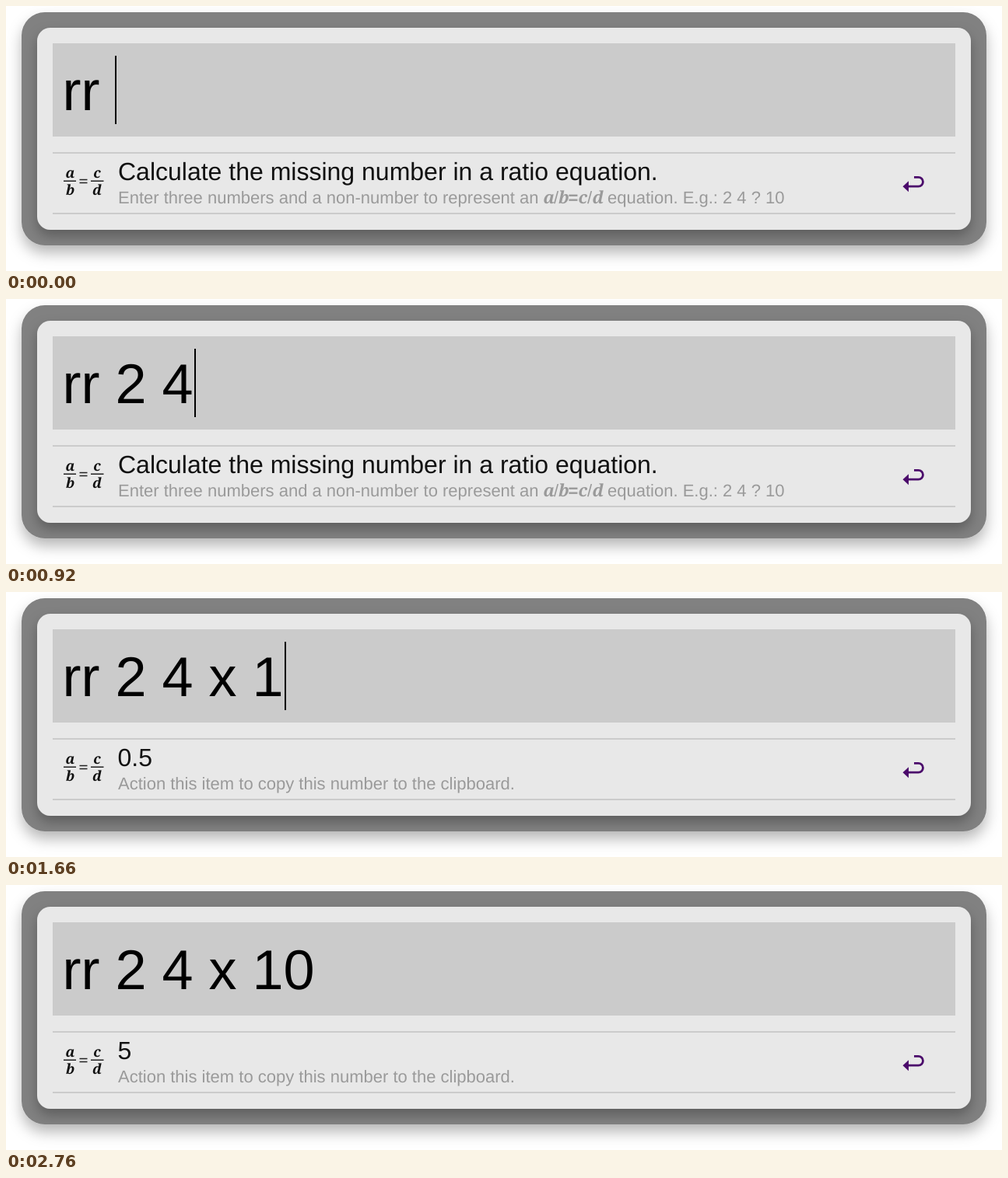
Recreate the animation shown at these times as an HTML page. Size 1280 px wide and 341 px high, loop 2.78 s.

```html
<!DOCTYPE html>
<html lang="en">
<head>
<meta charset="utf-8">
<title>Ratio calculator</title>
<style>
  html, body { margin: 0; width: 100%; height: 100%; overflow: hidden; background: #fff; }
  svg { display: block; width: 100%; height: 100%; }
  text { font-family: "Liberation Sans", Arial, sans-serif; font-kerning: none; text-rendering: geometricPrecision; }
  .query { font-size: 72px; fill: #000; }
  .title { font-size: 32px; fill: #111; }
  .sub { font-size: 22px; fill: #9a9a9a; }
  .math { font-family: "Noto Serif", serif; font-weight: 700; font-style: italic; }
  .icon text { font-size: 18px; text-anchor: middle; fill: #111; }
</style>
</head>
<body>
<svg viewBox="0 0 1280 341">
  <defs>
    <filter id="outerShadow" x="-5%" y="-20%" width="110%" height="140%">
      <feDropShadow dx="0" dy="10" stdDeviation="9" flood-color="#000" flood-opacity=".28"/>
    </filter>
    <filter id="innerShadow" x="-5%" y="-20%" width="110%" height="140%">
      <feDropShadow dx="0" dy="8" stdDeviation="8" flood-color="#000" flood-opacity=".28"/>
    </filter>
  </defs>

  <rect x="20" y="8" width="1240" height="300" rx="30" fill="#818181" filter="url(#outerShadow)"/>
  <rect x="40" y="28" width="1200" height="260" rx="17" fill="#e8e8e8" filter="url(#innerShadow)"/>
  <rect x="60" y="48" width="1160" height="120" fill="#cbcbcb"/>
  <path d="M60 189H1220M60 267H1220" stroke="#cbcbcb" stroke-width="2"/>

  <text id="query" class="query" x="72.5" y="134"></text>
  <rect id="caret" y="64" width="2" height="88"/>

  <g class="icon">
    <text class="math" x="82.5" y="221">a</text>
    <text class="math" x="82.5" y="242.5">b</text>
    <text class="math" x="117" y="221">c</text>
    <text class="math" x="117" y="242.5">d</text>
    <path d="M74 225.3H90M109 225.3H125.500M94.500 223.500H104.500M94.500 227.500H104.500" stroke="#222" stroke-width="1.6"/>
  </g>

  <g id="help">
    <text class="title" x="144" y="224">Calculate the missing number in a ratio equation.</text>
    <text class="sub" x="144" y="254">Enter three numbers and a non-number to represent an</text>
    <text class="sub" y="254"><tspan class="math" x="690.5">a</tspan><tspan x="704">/</tspan><tspan class="math" x="710">b</tspan><tspan x="722.5" font-weight="700">=</tspan><tspan class="math" x="735.5">c</tspan><tspan x="747">/</tspan><tspan class="math" x="753.5">d</tspan></text>
    <text class="sub" x="773" y="254">equation. E.g.: 2 4 ? 10</text>
  </g>
  <g id="answer">
    <text id="result" class="title" x="143.5" y="224"></text>
    <text class="sub" x="144" y="254">Action this item to copy this number to the clipboard.</text>
  </g>

  <path d="M1167 220.300H1172.500A5.900 5.900 0 0 1 1172.500 232.200H1158" fill="none" stroke="#4b0a6b" stroke-width="2.8"/>
  <path d="M1152.500 232.200L1160 225.300V239.200Z" fill="#4b0a6b"/>
</svg>
<script>
  const LOOP = 2780;
  const CARET_OFF = 2360;

  // Each keystroke: time, typed text, caret x, result (empty shows the help)
  const keys = [
    [0, "rr", 140, ""],
    [240, "rr 2", 182, ""],
    [400, "rr 2", 202, ""],
    [800, "rr 2 4", 242, ""],
    [1000, "rr 2 4", 262, ""],
    [1180, "rr 2 4 x", 298, ""],
    [1360, "rr 2 4 x", 318, "0"],
    [1660, "rr 2 4 x 1", 358, "0.5"],
    [1800, "rr 2 4 x 10", 398, "5"]
  ];

  const el = id => document.getElementById(id);
  const show = (id, on) => el(id).setAttribute("visibility", on ? "visible" : "hidden");

  function draw(t) {
    const [, typed, caretX, result] = keys.filter(k => k[0] <= t).pop();
    el("query").textContent = typed;
    el("result").textContent = result;
    el("caret").setAttribute("x", caretX);
    show("caret", t < CARET_OFF);
    show("help", !result);
    show("answer", result);
  }

  const start = performance.now();
  function tick() {
    draw((performance.now() - start) % LOOP);
    requestAnimationFrame(tick);
  }
  tick();
</script>
</body>
</html>
```
